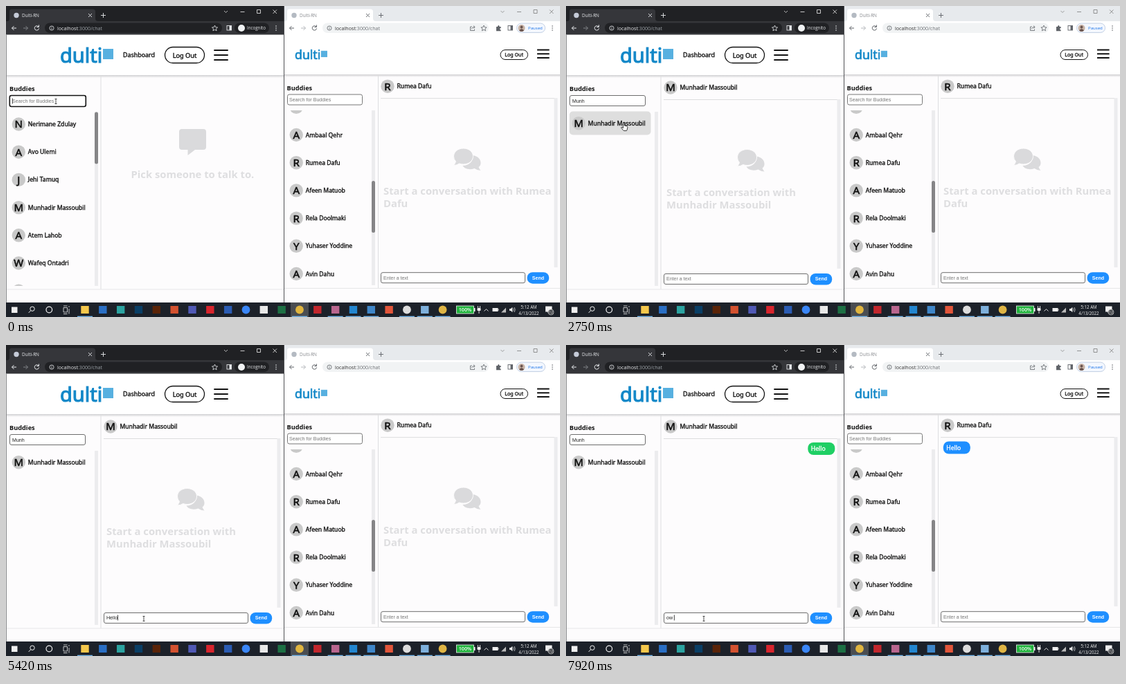
These frames come from a looping animation (800 px wide and 450 px high, 8 s). An HTML page:

```html
<!DOCTYPE html>
<html lang="en">
<head>
<meta charset="utf-8">
<title>Chat demo</title>
<style>
html, body { margin: 0; width: 100%; height: 100%; overflow: hidden; background: #fdfcfd; }
svg { display: block; width: 100vw; height: 100vh; }
text { font-family: "Noto Sans", sans-serif; white-space: pre; stroke-width: 0; }
.medium { stroke-width: .04em; }
.ui { font-family: "Open Sans", sans-serif; }
.field { font-family: "Liberation Sans", Arial, sans-serif; }
</style>
</head>
<body>
<svg id="stage" viewBox="0 0 800 450"></svg>
<script>
const LOOP = 8000;
const PEER = 'Munhadir Massoubil';
const SELF = 'Rumea Dafu';
const GREY = '#dadadc', BLUE = '#1e8fff';

// Drawing helpers
const text = (x, y, s, size, fill = '#111', extra = '') =>
  `<text x="${x}" y="${y}" font-size="${size}" fill="${fill}" stroke="${fill}" ${extra}>${s}</text>`;
const rect = (x, y, w, h, fill, r = 0, extra = '') =>
  `<rect x="${x}" y="${y}" width="${w}" height="${h}" rx="${r}" fill="${fill}" ${extra}/>`;
const disc = (x, y, r, fill, extra = '') =>
  `<circle cx="${x}" cy="${y}" r="${r}" fill="${fill}" ${extra}/>`;
const line = (d, stroke, w = 1, extra = '') =>
  `<path d="${d}" fill="none" stroke="${stroke}" stroke-width="${w}" ${extra}/>`;
const group = (id, body, extra = '') => `<g id="${id}" ${extra}>${body}</g>`;
const MEDIUM = 'class="medium"', BOLD = 'font-weight="700"';
const MIDDLE = 'text-anchor="middle"', UI = 'class="ui"', FIELD = 'class="field"';

const person = (x, y, name, size = 8.6) =>
  disc(x, y, 9.7, '#c9c9c9') +
  text(x, y + 5.4, name[0], 15, '#111', `${MEDIUM} ${MIDDLE}`) +
  text(x + 13.5, y + 3, name, size, '#111', MEDIUM);

const list = (x, y, names) =>
  names.map((name, i) => person(x, y + i * 40.2, name)).join('');

const bubbles = (x, y) => `<g transform="translate(${x} ${y})" fill="${GREY}">
  <path d="M27 10C35 11 39 16 39 21Q39 25 36 27Q37 30 39 32Q34 32 30 29C22 32 15 29 13 25C23 25 29 18 27 10Z"/>
  <path d="M14 0C22 0 28 5 28 11.5S22 23 14 23Q11 23 8 22Q5 24.5 0 24.5Q2 22 3 19Q0 16 0 11.5C0 5 6 0 14 0Z"
    stroke="#fdfcfd" stroke-width="1"/></g>`;

const heading = (x, y, lines) =>
  lines.map((s, i) => text(x, y + i * 17.8, s, 14.8, '#dedee0', BOLD)).join('');

const message = (x, y, color) =>
  rect(x, y, 39, 18, color, 8) + text(x + 4.5, y + 12, 'Hello', 8.6, '#fff', MEDIUM);

const composer = (x, y) =>
  rect(x, y, 208, 15, '#fff', 2.5, 'stroke="#6d6d6d"') +
  rect(x + 211, y - .5, 31.7, 16.5, BLUE, 8) +
  text(x + 227, y + 9.8, 'Send', 7.1, '#fff', `${FIELD} ${BOLD} ${MIDDLE}`);

const chatFrame = (x, y, name) =>
  person(x, y, name) +
  line(`M${x - 10} ${y + 17.5}h251`, '#dcdcde') +
  rect(x + 240.5, y + 17, 5, 245, '#ececee') +
  composer(x - 9.5, y + 269.5);

const hint = (x, y) => text(x, y, 'Enter a text', 7, '#777', FIELD);

const menu = (x, y, w, gap) =>
  line([-1, 0, 1].map(i => `M${x} ${y + i * gap}h${w}`).join(''), '#111', 2);

const wordmark = (x, y, k) =>
  text(x, y, 'dulti', 29 * k, '#1488c8', MEDIUM) + rect(x + 62 * k, y - 20 * k, 15 * k, 15 * k, '#57b0e0');

// Browser chrome shared by both windows
function browser(x, width, dark) {
  const ink = dark ? '#e8eaed' : '#5f6368', faint = dark ? '#808387' : '#b5b8bc';
  const strip = dark ? '#202124' : '#e7eaed', bar = dark ? '#35363a' : '#fff';
  const caption = dark ? '#ddd' : '#888';
  const fieldEnd = dark ? 312 : 697, capX = dark ? 317.5 : 717;
  const star = (sx, sy) => line(`M${sx} ${sy - 4}l1.2 2.7 2.9.3-2.2 1.9.7 2.9-2.6-1.5-2.6 1.5.7-2.9-2.2-1.9 2.9-.3z`, ink, .8);
  return rect(x, 0, width, 22, strip) + rect(x, 22, width, 19.5, bar) +
    `<path d="M${x + 2} 22Q${x + 5} 22 ${x + 5} 18V8Q${x + 5} 4.5 ${x + 8} 4.5H${x + 125}Q${x + 129} 4.5 ${x + 129} 8V18Q${x + 129} 22 ${x + 133} 22Z" fill="${bar}"/>` +
    disc(x + 15, 13.5, 3.7, dark ? '#c5cbd8' : '#b4bac2') +
    text(x + 23, 16, 'Dulti-RN', 6.4, dark ? '#e8eaed' : '#85888c', UI) +
    line(`M${x + 119} 11l5 5m0-5l-5 5`, ink, .9) +
    line(`M${x + 137} 13.5h7m-3.5-3.5v7`, ink, .9) +
    line(`M${capX - 2.5} 7l2.5 2.5 2.5-2.5`, caption, .8) +
    line(`M${capX + 21} 8.5h6m18-3h5v5h-5zm23 0l5.5 5.5m0-5.5l-5.5 5.5`, caption, .9) +
    line(`M${x + 15} 32h-6.5m3-3l-3 3 3 3`, ink) +
    line(`M${x + 25} 32h6.5m-3-3l3 3-3 3`, faint) +
    line(`M${x + 47} 30a3.2 3.2 0 1 0 .6 2.4m-.2-5v3h-3`, ink) +
    rect(x + 56, 24.5, fieldEnd - x - 56, 14.5, dark ? '#202124' : '#f1f3f4', 7.2) +
    disc(x + 66, 32, 3.1, 'none', `stroke="${ink}" stroke-width=".8"`) +
    line(`M${x + 66} 30v.8m0 .8v2.3`, ink, .8) +
    text(x + 74, 34.5, `localhost<tspan fill="${dark ? '#9aa0a6' : '#6d7175'}">:3000/chat</tspan>`, 7.15, dark ? '#e8eaed' : '#333', UI) +
    star(dark ? 301.5 : 690, 32) +
    rect(dark ? 319 : 725, 28.5, 6.5, 6.5, 'none', 0, `stroke="${ink}" stroke-width=".9"`) +
    rect(dark ? 322.5 : 728.5, 28.5, 3, 6.5, ink) +
    [-3, 0, 3].map(d => disc(dark ? 390 : 789, 32 + d, .8, ink)).join('');
}

function leftWindow() {
  return rect(0, 41, 401, 388, '#fdfcfd') + rect(0, 41, 401, 59, '#fff') +
    rect(0, 100, 401, 4, 'url(#shade)') +
    browser(0, 401, true) +
    rect(330, 24.5, 50, 14.5, '#202124', 7.2) + disc(340, 32, 5, '#f1f3f4') +
    text(348, 34.4, 'Incognito', 6.2, '#e8eaed', UI) +
    wordmark(78, 82, 1) +
    text(169, 74.3, 'Dashboard', 8.9, '#111', MEDIUM) +
    rect(229.5, 59.5, 57, 23, '#fff', 11.5, 'stroke="#111" stroke-width="1.3"') +
    text(258, 74.5, 'Log Out', 9.2, '#111', `${MEDIUM} ${MIDDLE}`) +
    menu(300.3, 71, 20.4, 7) +
    line('M137 101V410', '#dedee0') + line('M0 410H401', '#e6e6e8') +
    text(5, 123.3, 'Buddies', 9.2, '#111', BOLD) +
    group('focusedSearch', rect(5.3, 129.5, 110, 16, '#fff', 2.5, 'stroke="#111" stroke-width="1.6"')) +
    group('plainSearch', rect(5.5, 129.5, 109, 15, '#fff', 2.5, 'stroke="#6d6d6d"')) +
    text(9, 139.7, '', 7.1, '#222', `${FIELD} id="query"`) +
    rect(128, 153, 5, 252, '#ececee') +
    group('everyone', rect(128, 153.5, 5, 75, '#858587', 2.5) +
      group('', list(18.3, 171, ['Nerimane Zdulay', 'Avo Ulemi', 'Jehi Tamuq', PEER,
        'Atem Lahob', 'Wafeq Ontadri', 'Kelim']), 'clip-path="url(#leftList)"')) +
    group('match', rect(5, 153.8, 117.5, 34, '#dedede', 5, 'id="hover"') + person(18.3, 171, PEER)) +
    group('pick', `<path d="M254 178H285Q289 178 289 182V204Q289 208 285 208H273L262.5 216V208H254Q250 208 250 204V182Q250 178 254 178Z" fill="${GREY}"/>` +
      heading(180.5, 249, ['Pick someone to talk to.'])) +
    group('chat', chatFrame(151, 118, PEER) +
      group('leftEmpty', bubbles(247.5, 207.5) + heading(145, 275, ['Start a conversation with', PEER])) +
      group('sent', message(349.3, 141, '#1fcf64')) +
      group('leftHint', hint(145, 397)) +
      text(145, 397, '', 7.1, '#222', `${FIELD} id="draft"`)) +
    line('', '#111', .8, 'id="caret"') +
    line('M.5 41V429', '#8a8b8d');
}

function rightWindow() {
  const x = 401;
  return rect(x, 41, 399, 388, '#fdfcfd') + rect(x, 41, 399, 58, '#fff') +
    rect(x, 99, 399, 4, 'url(#shade)') +
    browser(x, 399, false) +
    line('M673 30h-2.5v5.5h6v-2m-4 0q0-3 4.5-3m-2-2l2.2 2-2.2 2', '#5f6368', .8) +
    `<path d="M708 30h2q0-2 1.3-2t1.3 2h2v2q-1.5 0-1.5 1.2t1.5 1.2v1.8h-6.6z" fill="#5f6368"/>` +
    rect(737.5, 25, 41, 13.5, '#f3f7fe', 6.7, 'stroke="#c3d0e4"') +
    disc(744.5, 32, 5, '#c9b5a8') + disc(744.5, 30.5, 1.9, '#6a5550') +
    `<path d="M741 35.5q3.5-5 7 0q-3.5 3-7 0z" fill="#6a5550"/>` +
    text(754, 34.3, 'Paused', 6.1, '#1a73e8', UI) +
    wordmark(417, 77, .61) +
    rect(714, 63.5, 39.5, 14, '#fff', 7, 'stroke="#111"') +
    text(733.7, 73.2, 'Log Out', 7.1, '#111', `${MEDIUM} ${MIDDLE}`) +
    menu(767, 69.2, 17.6, 5.8) +
    line('M537.5 100V409', '#dedee0') + line('M402 408.5H800', '#e6e6e8') +
    text(405.5, 121.8, 'Buddies', 9.2, '#111', BOLD) +
    rect(406.5, 128, 108, 15, '#fff', 2.5, 'stroke="#777"') +
    text(409, 138, 'Search for Buddies', 7.1, '#777', FIELD) +
    rect(528, 151, 5, 253, '#ececee') + rect(528, 253, 5, 75, '#858587', 2.5) +
    group('', list(419.2, 146.3, ['  ', 'Ambaal Qehr', SELF, 'Afeen Matuob', 'Rela Doolmaki',
      'Yuhaser Yoddine', 'Avin Dahu']), 'clip-path="url(#rightList)"') +
    chatFrame(551, 116.2, SELF) + hint(545, 395.5) +
    group('rightEmpty', bubbles(646.5, 206) +
      heading(545, 273.3, ['Start a conversation with ' + SELF.split(' ')[0], SELF.split(' ')[1]])) +
    group('received', message(544.8, 139.5, BLUE)) +
    line('M401.5 0V429', '#505154');
}

function taskbar() {
  const apps = ['#f5c84c', '#2a6fc4', '#2ba3a0', '#0a3f66', '#5a2408', '#d35230', '#5059b5', '#d8252d', '#2b5cb3',
    '#3a86f7', '#e8e8e8', '#1d7044', '#e0b53f', '#c2272d', '#b9668f', '#2386cf', '#3f86c8', '#e2553a',
    '#dcdcdc', '#7eb0dc', '#dfb544'];
  const round = [9, 12, 18, 20], open = [0, 12, 14, 15, 16, 18, 19, 20];
  const icons = apps.map((color, i) => {
    const x = 114 + i * 25.83;
    return (i === 12 ? rect(x - 13, 429, 26, 21, '#4a4d51') : '') +
      (round.includes(i) ? disc(x, 439.5, 5.9, color) : rect(x - 5.7, 434, 11.4, 11, color)) +
      (open.includes(i) ? rect(x - 11, 448.7, 22, 1.3, '#76b9ed') : '');
  }).join('');
  const w = '#f0f0f0';
  return rect(0, 429, 800, 21, '#1c2129') +
    rect(8, 435.5, 8.5, 8.5, w) +
    disc(38, 438.2, 3.2, 'none', `stroke="${w}" stroke-width="1"`) + line('M35.7 440.7l-3 3.2', w) +
    disc(62.3, 439.5, 4.3, 'none', `stroke="${w}" stroke-width="1.2"`) +
    line('M83 436.5h5.5v6.5h-5.5zm0-2.5h5.5m-5.5 11.5h5.5m2.5-11.5v2m0 2v7.5', w, .8) + icons +
    rect(650.5, 434, 25, 11, '#20b33c', 0, `stroke="${w}" stroke-width=".8"`) + rect(676, 437, 1.5, 5, w) +
    text(663, 442.4, '100%', 7.2, '#fff', `${UI} ${MIDDLE} font-weight="600"`) +
    line('M681.5 434v3m3-3v3m-1.5 4v4', w, .9) + rect(680.5, 437, 5, 4, w, 1) +
    line('M690.5 441.5l3-3 3 3', w, .9) +
    rect(702.5, 437, 8, 5, w) + rect(710.5, 438.5, 1, 2, w) +
    `<path d="M715 443.5h7v-7z" fill="#bbb"/>` +
    `<path d="M727 438h2l2.3-2.2v7.4l-2.3-2.2h-2z" fill="${w}"/>` +
    line('M732.5 437.5q1.5 2 0 4m1.5-5.5q2.5 3.5 0 7', w, .7) +
    text(755, 438, '5:12 AM', 6.2, w, `${UI} ${MIDDLE}`) + text(755, 447, '4/13/2022', 6.2, w, `${UI} ${MIDDLE}`) +
    `<path d="M779 434.5h9.5v8h-4l-2 2v-2h-3.5z" fill="${w}"/>` + disc(787, 443, 4, '#3b3e42', `stroke="${w}" stroke-width=".6"`) +
    text(787, 445, '12', 5, '#fff', `${UI} ${MIDDLE}`);
}

const pointer = {
  beam: line('M-1.5-3.5h3m-1.5 0v7m-1.5 0h3', '#222', .8),
  hand: `<path d="M-1.5-5.5q1.3-1 1.8.3v3.2l3.8 1q1 .4.8 1.8l-.7 3.2-.8 1.5h-4l-3.6-4q-.4-1.5 1.2-1l1.5 1.2z" fill="#fff" stroke="#111" stroke-width=".8"/>`,
  arrow: `<path d="M0 0v10l2.3-2.1 1.6 3.5 1.5-.7-1.5-3.4h3.1z" fill="#fff" stroke="#111" stroke-width=".7"/>`
};

document.getElementById('stage').innerHTML =
  `<defs><linearGradient id="shade" x2="0" y2="1">
     <stop stop-color="#cfcfd1"/><stop offset="1" stop-color="#fdfcfd"/></linearGradient>
   <clipPath id="leftList">${rect(0, 153, 127, 252, '#000')}</clipPath>
   <clipPath id="rightList">${rect(402, 151, 125, 253, '#000')}</clipPath></defs>` +
  leftWindow() + rightWindow() + taskbar() +
  group('cursor', Object.entries(pointer).map(([id, shape]) => group(id, shape)).join(''));

const el = Object.fromEntries([...document.querySelectorAll('[id]')].map(node => [node.id, node]));
const show = (id, on) => el[id].setAttribute('visibility', on ? 'inherit' : 'hidden');

// Timeline
const OPEN = 2600, FOCUS = 3750, SENT = 6250, RECEIVED = 7000;
const queryKeys = [[0, ''], [920, 'M'], [1090, 'Mu'], [1330, 'Mun'], [1500, 'Munh']];
const draftKeys = [[FOCUS, ''], [4000, 'H'], [4500, 'He'], [4830, 'Hel'], [5000, 'Hell'], [5170, 'Hello'],
  [6830, ''], [7250, 'o'], [7420, 'ow'], [7580, 'ow ']];
const mouse = [[0, 72, 138], [2080, 72, 138], [2500, 84, 175], [2920, 84, 175], [3670, 199, 396], [LOOP, 199, 396]];

const typed = (keys, t) => keys.filter(k => k[0] <= t).pop() || [0, ''];

function mouseAt(t) {
  const i = mouse.findIndex(k => k[0] > t);
  const [t0, x0, y0] = mouse[i - 1], [t1, x1, y1] = mouse[i];
  const p = (t - t0) / (t1 - t0), e = p * p * (3 - 2 * p);
  return [x0 + (x1 - x0) * e, y0 + (y1 - y0) * e];
}

function draw(t) {
  const opened = t >= OPEN, writing = t >= FOCUS;
  const [queryTime, query] = typed(queryKeys, t), [draftTime, draft] = typed(draftKeys, t);
  const [x, y] = mouseAt(t);
  const over = query !== '' && x < 123 && y > 153 && y < 187;

  el.query.textContent = query || 'Search for Buddies';
  el.query.setAttribute('fill', query ? '#222' : '#777');
  el.draft.textContent = draft;
  el.match.setAttribute('transform', `translate(0 ${opened ? -1.3 : 0})`);
  show('focusedSearch', !opened);
  show('plainSearch', opened);
  show('everyone', !query);
  show('match', query);
  show('hover', over);
  show('pick', !opened);
  show('chat', opened);
  show('leftEmpty', t < SENT);
  show('sent', t >= SENT);
  show('leftHint', !draft);
  show('rightEmpty', t < RECEIVED);
  show('received', t >= RECEIVED);

  const keyTime = writing ? draftTime : queryTime;
  const field = writing ? el.draft : el.query;
  const left = writing ? 145 : 9;
  const width = (writing ? draft : query) ? field.getComputedTextLength() : 0;
  show('caret', (writing || !opened) && (t - keyTime) % 1000 < 500);
  el.caret.setAttribute('d', `M${left + width + .3} ${writing ? 390.5 : 133.5}v8`);

  const inField = y < 146 || y > 386;
  show('beam', inField);
  // An inherited state keeps the hover pieces hidden with their parents
  show('hand', over);
  show('arrow', !inField && !over);
  el.cursor.setAttribute('transform', `translate(${x} ${y})`);
}

function tick() {
  draw(performance.now() % LOOP);
  requestAnimationFrame(tick);
}
tick();
</script>
</body>
</html>
```
